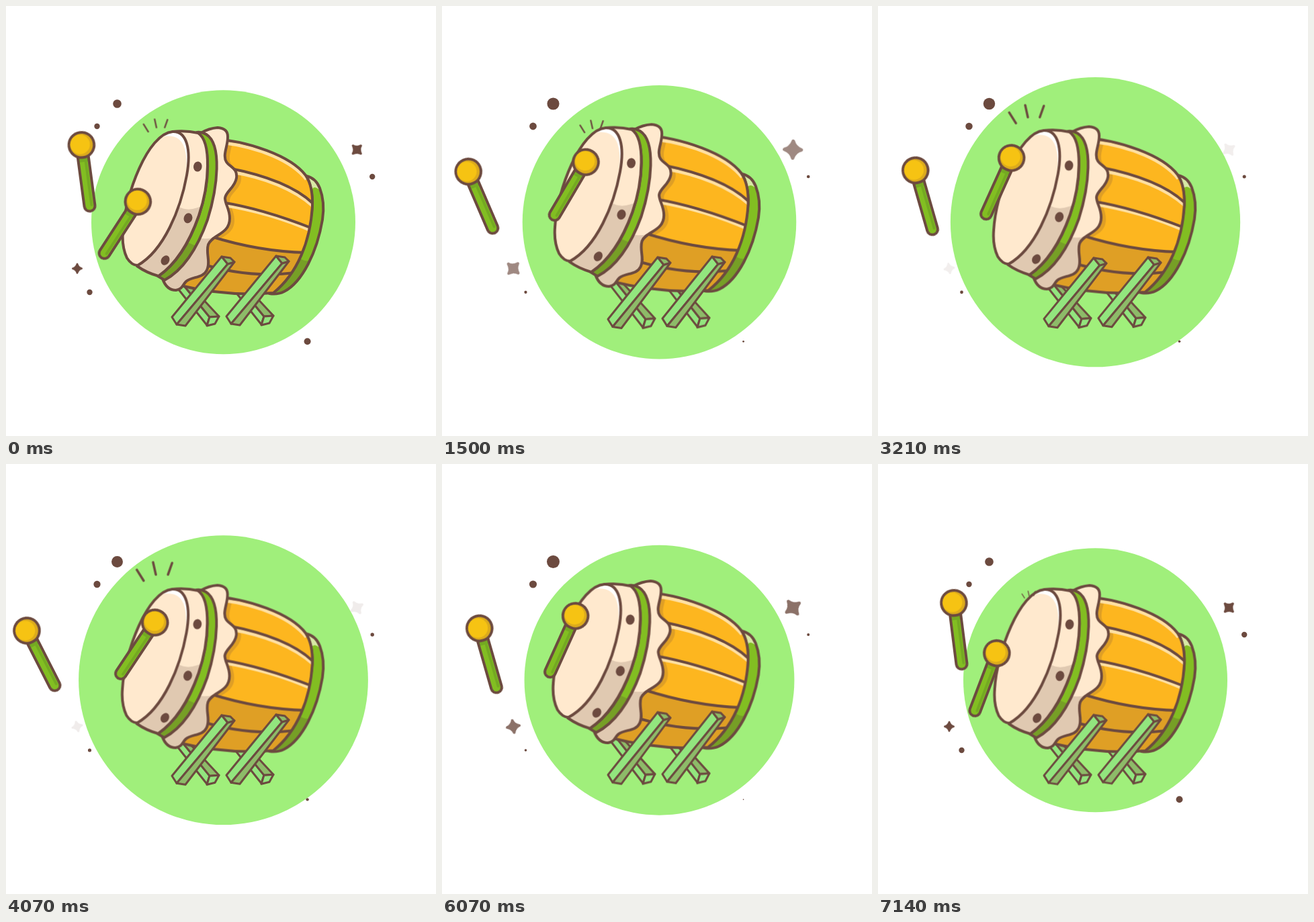
An HTML page that plays this animation: 640 px wide and 640 px high, repeating every 7210 ms.

```html
<!DOCTYPE html>
<html lang="en">
<head>
<meta charset="utf-8">
<title>Drum</title>
<style>
  html, body { margin: 0; width: 100%; height: 100%; overflow: hidden; background: #fff; }
  svg { display: block; width: 100%; height: 100%; }
  .ink { stroke: #6c4a3f; stroke-width: 4; stroke-linejoin: round; stroke-linecap: round; }
  .thin { stroke-width: 3; }
  .dark { fill: #6c4a3f; }
  .none { fill: none; }
  .cream { fill: #ffe9ce; }
  .tan { fill: #e0c9b1; }
  .orange { fill: #fdb61f; }
  .amber { fill: #df9f25; }
  .green { fill: #82be22; }
  .olive { fill: #769f26; }
  .mint { fill: #92e57e; }
  .moss { fill: #8dbb68; }
  .shine { fill: none; stroke: #ffe0a3; stroke-width: 5; }
</style>
</head>
<body>
<svg viewBox="0 0 640 640">
  <defs>
    <path id="barrel" d="M300 197C362 200 425 224 446 252Q457 268 456 298C453 350 434 398 398 427C350 431 300 426 255 415Z"/>
    <path id="skirt" d="M290 189Q302 182 315 181Q331 182 330 196C330 209 322 222 328 232C333 240 345 241 343 256C341 270 327 276 326 286C326 295 333 302 333 316C333 340 307 340 301 355C297 368 305 381 299 393C293 406 277 402 268 410C262 416 263 421 253 423Q239 423 233 406Z"/>
    <path id="band" d="M284 188Q291 187 298 191C322 206 315 270 300 318C283 366 260 395 236 408L226 402C251 386 272 356 287 312C303 265 307 205 284 188Z"/>
    <path id="hoop" d="M248 187Q268 185 286 189C306 202 303 265 287 312C271 357 250 386 227 402Q209 397 195 387Z"/>
    <path id="face" d="M248 187C269 186 276 213 269 252C260 302 235 364 196 386Q187 386 180 375Q172 358 174 335C177 281 211 190 248 187Z"/>
    <path id="rim" d="M447 253Q461 256 467 271Q475 292 471 318C463 366 441 411 414 425Q404 430 392 428C426 406 447 362 454 314Q460 278 447 253Z"/>
    <clipPath id="inBarrel"><use href="#barrel"/></clipPath>
    <clipPath id="inSkirt"><use href="#skirt"/></clipPath>
    <clipPath id="inBand"><use href="#band"/></clipPath>
    <clipPath id="inHoop"><use href="#hoop"/></clipPath>
    <clipPath id="inFace"><use href="#face"/></clipPath>
    <clipPath id="inRim"><use href="#rim"/></clipPath>

    <g id="backLeg" class="ink thin">
      <path class="mint" d="M245 407L299 475L303 463L254 403Z"/>
      <path class="moss" d="M254 403L303 463L317 462L262 403Z"/>
      <path class="mint" d="M303 463L317 462L311 473L299 476Z"/>
    </g>
    <g id="frontLeg" class="ink thin">
      <path class="mint" d="M321 373L330 384L254 474L247 463Z"/>
      <path class="moss" d="M330 384L340 381L267 476L254 474Z"/>
      <path class="moss" d="M321 373L334 375L340 381L330 384Z"/>
    </g>
    <g id="stick">
      <path class="ink" style="stroke-width:20" d="M0 0V-84"/>
      <path stroke="#82be22" stroke-width="12" stroke-linecap="round" d="M0 0V-84"/>
      <path stroke="#74aa22" stroke-width="4" stroke-linecap="round" d="M3 -1V-84"/>
      <path stroke="#74aa22" stroke-width="12" d="M0 -66V-74"/>
      <circle cy="-91.5" r="18.8" fill="#dcab1c" class="ink"/>
      <circle cx="-2" cy="-92.5" r="14.6" fill="#f6c313"/>
    </g>
    <path id="star" d="M0 -8.3Q1.5 -2.4 8.3 0Q2.4 1.5 0 8.3Q-1.5 2.4 -8.3 0Q-2.4 -1.5 0 -8.3Z" class="ink dark" style="stroke-width:3.4"/>
  </defs>

  <circle id="disc" cx="323.5" cy="321.7" r="196.5" fill="#a0ef7b"/>

  <g class="dark">
    <circle class="dot" cx="165.5" cy="145.5" r="6.3" data-far="9.5"/>
    <circle class="dot" cx="135.5" cy="179" r="4.2" data-far="5.6"/>
    <circle class="dot" cx="545.2" cy="254" r="4.2" data-far="2"/>
    <circle class="dot" cx="124.5" cy="426" r="4.2" data-far="1.8"/>
    <circle class="dot" cx="448.6" cy="499.3" r="5" data-far=".8"/>
  </g>
  <g transform="translate(522.3 213.8) rotate(45)"><use class="star" href="#star" data-turn="-360"/></g>
  <g transform="translate(106 390.7) scale(.8)"><use class="star" href="#star" data-turn="360"/></g>

  <g class="stand">
    <use href="#backLeg"/>
    <use href="#backLeg" x="81" y="-1"/>
  </g>

  <g id="drum">
    <use href="#rim" class="green"/>
    <g clip-path="url(#inRim)">
      <path class="olive" d="M435 374Q451 386 466 372L450 440H380Z"/>
      <path fill="#d8e8a5" d="M444 250L464 262L467 274Q459 267 456 272Z"/>
    </g>
    <use href="#rim" class="ink none"/>

    <use href="#barrel" class="orange"/>
    <g clip-path="url(#inBarrel)">
      <path class="amber" d="M290 341Q360 364 460 367V440H240Z"/>
      <use href="#skirt" class="amber" x="7" y="3"/>
      <g class="shine">
        <path d="M320 203C378 210 426 231 447 258"/>
        <path d="M336 247C385 255 430 273 457 298"/>
        <path d="M322 296C372 304 420 319 456 335"/>
      </g>
      <g class="ink none">
        <path d="M330 241C382 251 430 268 457 294"/>
        <path d="M320 292C372 300 418 316 456 331"/>
        <path d="M305 343C350 357 400 366 446 367"/>
        <path d="M285 382Q360 406 430 397"/>
      </g>
    </g>
    <use href="#barrel" class="ink none"/>

    <use href="#skirt" class="cream"/>
    <path class="tan" clip-path="url(#inSkirt)" d="M282 344Q304 352 334 333V430H220Z"/>
    <use href="#skirt" class="ink none"/>

    <use href="#band" class="green"/>
    <path class="olive" clip-path="url(#inBand)" d="M266 350L292 361L240 420H215Z"/>
    <use href="#band" class="ink none"/>

    <use href="#hoop" class="cream"/>
    <path class="tan" clip-path="url(#inHoop)" d="M256 298Q273 309 298 294V410H180Z"/>
    <use href="#hoop" class="ink none"/>

    <use href="#face" class="cream"/>
    <path clip-path="url(#inFace)" fill="#fff" d="M232 185H275L268 255C271 215 266 190 236 194Z"/>
    <use href="#face" class="ink none"/>

    <g class="dark">
      <ellipse cx="285.3" cy="239" rx="6.3" ry="7.6" transform="rotate(8 285.3 239)"/>
      <ellipse cx="271" cy="315.7" rx="6.3" ry="7.6" transform="rotate(18 271 315.7)"/>
      <ellipse cx="237" cy="378.5" rx="6" ry="7.6" transform="rotate(32 237 378.5)"/>
    </g>
  </g>

  <g class="stand">
    <use href="#frontLeg"/>
    <use href="#frontLeg" x="81" y="-1"/>
  </g>

  <g transform="translate(226 215)">
    <path id="sparks" class="ink none" style="stroke-width:3.5" d="M-31 -57L-21 -41M-7 -68L-3 -50M21 -67L15 -50"/>
  </g>

  <use id="leftStick" href="#stick"/>
  <use id="rightStick" href="#stick"/>
</svg>

<script>
const LOOP = 7210;
const BEAT = LOOP / 8;
const SWING = LOOP / 3;
const SINE = 'cubic-bezier(.37,0,.63,1)';
const QUAD_IN = 'cubic-bezier(.11,0,.5,0)';
const QUAD_OUT = 'cubic-bezier(.5,1,.89,1)';
const CUBIC_IN = 'cubic-bezier(.32,0,.67,0)';

const $ = id => document.getElementById(id);
const each = (selector, fn) => document.querySelectorAll(selector).forEach(fn);
const play = (el, frames, duration, extra) =>
  el.animate(frames, { duration, iterations: Infinity, ...extra });

// Smooth there-and-back motion; `half` is the time one way.
const sway = (el, prop, from, to, half) =>
  play(el, { [prop]: [from, to] }, half, { direction: 'alternate', easing: SINE });

sway($('disc'), 'r', '196.5px', '216.2px', LOOP / 2);

each('.dot', dot =>
  sway(dot, 'r', dot.getAttribute('r') + 'px', dot.dataset.far + 'px', SWING / 2));

each('.star', star => {
  sway(star, 'rotate', '0deg', star.dataset.turn + 'deg', LOOP / 2);
  sway(star, 'opacity', 1, .07, LOOP / 2);
  sway(star, 'scale', 1, 1.55, LOOP / 4);
});

// Each beat the drum and its stand recoil once and settle again.
const recoil = (el, hit) => {
  const rest = 'none';
  play(el, [
    { transform: rest },
    { offset: .44, transform: rest, easing: QUAD_IN },
    { offset: .71, transform: hit },
    { offset: .735, transform: hit, easing: SINE },
    { offset: .95, transform: rest },
    { transform: rest }
  ], BEAT);
};
recoil($('drum'), 'matrix(1.028,.018,0,1,-13.2,-12.5)');
each('.stand', stand => recoil(stand, 'translateY(476px) scaleY(1.034) translateY(-476px)'));

// The sparks burst out late in the beat and collapse during the next one.
play($('sparks'), [
  { transform: 'scale(0)', easing: QUAD_OUT },
  { offset: .35, transform: 'scale(1.01)' },
  { offset: .65, transform: 'scale(1.01)', easing: CUBIC_IN },
  { offset: .885, transform: 'scale(0)' },
  { transform: 'scale(0)' }
], BEAT, { delay: -.15 * BEAT });

// A pose places the grip and tilts the stick around it.
const pose = (x, y, tilt) => ({ transform: `translate(${x}px,${y}px) rotate(${tilt}deg)` });

const swing = (el, { hit, lift, highLift, highHit, windup }) => play(el, [
  { ...hit, easing: SINE },
  { ...lift, offset: .11, easing: SINE },
  { ...highLift, offset: .275 },
  { ...highLift, offset: .525, easing: SINE },
  { ...highHit, offset: .69, easing: SINE },
  { ...windup, offset: .955, easing: QUAD_IN },
  hit
], SWING);

swing($('leftStick'), {
  hit: pose(124.5, 297.5, -7.6),
  lift: pose(118, 295.5, -14.5),
  highLift: pose(81, 332.5, -16),
  highHit: pose(72.5, 329.5, -27),
  windup: pose(124.5, 297.5, -7.2)
});
swing($('rightStick'), {
  hit: pose(146.5, 368, 33),
  lift: pose(133.5, 361, 23.8),
  highLift: pose(161, 309.5, 24.3),
  highHit: pose(171, 312, 33.7),
  windup: pose(144, 367, 19)
});
</script>
</body>
</html>
```
